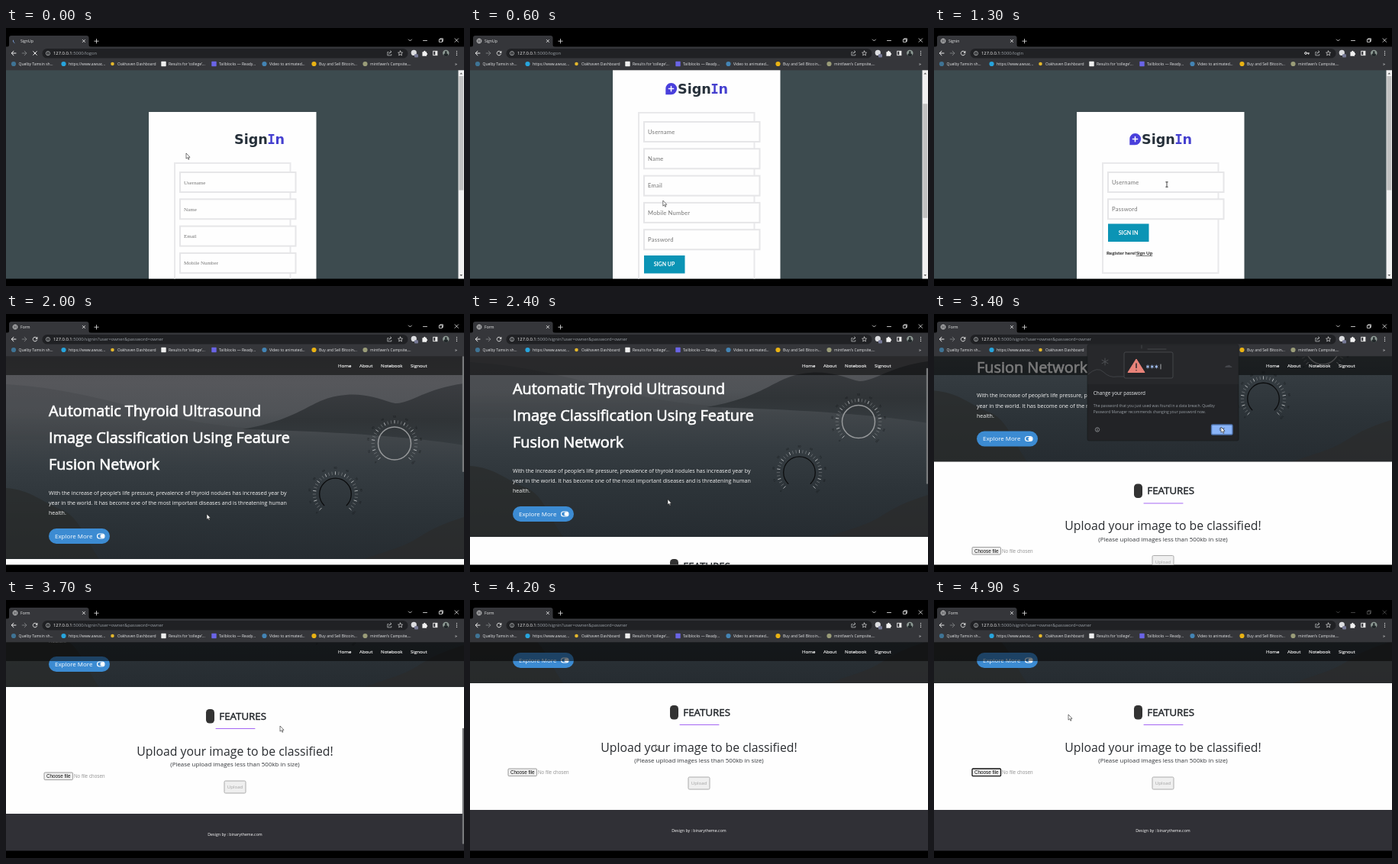
These frames come from a looping animation (600x338 px, 5 s). An HTML page:

```html
<!DOCTYPE html>
<html lang="en">
<head>
<meta charset="utf-8">
<title>Sign in and upload</title>
<style>
  html, body { margin: 0; width: 100%; height: 100%; overflow: hidden; background: #000; }
  svg { display: block; width: 100vw; height: 100vh; }
  text { font-family: "Open Sans", "Noto Sans", sans-serif; white-space: pre; }
  .serif { font-family: "Liberation Serif", serif; }
  .lato { font-family: Lato, sans-serif; }
  .arial { font-family: "Liberation Sans", sans-serif; }
  .logo { font-family: "DejaVu Sans", sans-serif; font-weight: 700; }
  .mono { font-family: "DejaVu Sans Mono", monospace; }
  .line { fill: none; stroke-linecap: round; stroke-linejoin: round; }
</style>
</head>
<body>
<svg id="stage" viewBox="0 0 600 338"></svg>
<script>
const LOOP = 5000, STEP = 100;

// ---------- drawing helpers ----------
const text = (x, y, s, size, fill, extra = '') =>
  `<text x="${x}" y="${(y + size * 0.36).toFixed(2)}" font-size="${size}" fill="${fill}" ${extra}>${s}</text>`;
const rect = (x, y, w, h, fill, extra = '') =>
  `<rect x="${x}" y="${y}" width="${w}" height="${h}" fill="${fill}" ${extra}/>`;
const dot = (x, y, r, fill, extra = '') =>
  `<circle cx="${x}" cy="${y}" r="${r}" fill="${fill}" ${extra}/>`;
const line = (d, color, width = 0.8, extra = '') =>
  `<path class="line" d="${d}" stroke="${color}" stroke-width="${width}" ${extra}/>`;
const shape = (d, fill, extra = '') => `<path d="${d}" fill="${fill}" ${extra}/>`;
const group = (id, body, extra = '') => `<g id="${id}" ${extra}>${body}</g>`;
const bold = (color, w) => `stroke="${color}" stroke-width="${w}"`;
const middle = 'text-anchor="middle"';

// ---------- sign-up and sign-in pages ----------
const frame = (x, y, w, h) => rect(x, y, w, h, 'none', 'stroke="#e9e9eb" stroke-width="2"');
const field = (i, id, label, cls) => {
  const y = 189 + i * 35.3;
  return rect(228, y, 151.5, 26, '#fefefe', 'stroke="#e6e6e8" stroke-width="2"') +
    text(233, y + 13, label, cls === 'serif' ? 7.03 : 7.6, '#757575',
      `${id ? `id="${id}"` : ''} class="${cls}" ${cls === 'lato' ? 'letter-spacing=".22"' : ''}`);
};
const heading = x =>
  `<text class="logo" x="${x}" y="152.3" font-size="17.6" fill="#26303a">Sign<tspan class="mono" fill="#4540cf" dx="-.5">I</tspan><tspan fill="#4540cf" dx="-.5">n</tspan></text>`;
const bubble = shape('M263.5 138a7.6 7.6 0 1 1 0 15.2h-7.2v-7.6a7.4 7.4 0 0 1 7.2-7.6z', '#4a40dc') +
  line('M260.4 145.6h6.2M263.5 142.5v6.2', '#fff', 1.5);
const button = (y, label) =>
  rect(228, y, 53.5, 23.5, '#0b94b5') +
  text(254.5, y + 11.7, label, 7, '#fff', `class="lato" font-weight="700" ${middle}`);
const hint = (y, lead, link) =>
  text(226, y, `${lead}<tspan text-decoration="underline">${link}</tspan>`, 6.3, '#222', 'class="lato" font-weight="700"');
const card = h => rect(187, 110, 219.5, h, '#fefefe');
const fields = cls => ['Username', 'Name', 'Email', 'Mobile Number', 'Password']
  .map((s, i) => field(i, '', s, cls)).join('');

const backdrop = rect(0, 55, 600, 274, '#3d4b4f');
const sideBar = id => rect(592.5, 55, 7.5, 274, '#f1f1f1') +
  rect(593.3, 63, 6, 149.5, '#c1c1c1', `id="${id}"`) +
  shape('M594.5 60.5l1.8-2 1.8 2z', '#555') + shape('M594.5 323l1.8 2 1.8-2z', '#555');

const signUp = backdrop +
  group('signUpBody', card(380) + frame(221, 177, 151.5, 262) +
    group('plain', heading(299) + fields('serif')) +
    group('styled', bubble + heading(272) + fields('lato')) +
    button(364, 'SIGN UP') + hint(402, 'Registered?', 'Sign In')) +
  sideBar('signUpThumb');

const signIn = backdrop + card(230) + bubble + heading(272) + frame(221, 177, 151.5, 144) +
  field(0, 'userText', 'Username', 'lato') + field(1, 'passText', 'Password', 'lato') +
  button(256.5, 'SIGN IN') + hint(295, 'Register here!', 'Sign Up') + sideBar('signInThumb');

// ---------- home page ----------
function gauge(cx, cy, r, ring, gap) {
  let out = '';
  for (let i = 0; i <= 30; i++) {
    const a = -135 + i * 9, big = i % 3 === 0;
    out += `<g transform="translate(${cx} ${cy}) rotate(${a})">` +
      line(`M0 ${-r - 5}V${-r - 8.5}`, big ? '#b4b7b9' : '#7d8285', big ? 0.9 : 0.6) +
      (big ? text(0, -r - 13.5, i / 3 * 10, 3.4, '#15181a', middle) : '') + '</g>';
  }
  const k = r * Math.SQRT1_2;
  return out + (gap
    ? line(`M${cx - k} ${cy + k}A${r} ${r} 0 1 1 ${cx + k} ${cy + k}`, ring, 1.3)
    : dot(cx, cy, r, 'none', `stroke="${ring}" stroke-width="1.5"`));
}

const scenery =
  rect(0, 55, 600, 266, 'url(#lake)') +
  shape('M0 92C70 96 130 112 190 128S280 146 330 151L330 165H0z', '#3c4144', 'opacity=".3"') +
  shape('M310 151C345 145 368 136 388 126S420 108 445 106S485 110 505 116S545 98 600 91V172C540 162 440 154 310 151z', 'url(#hill)') +
  shape('M0 228C32 230 48 247 72 256S102 293 122 320.800H0z', '#292a29', 'opacity=".65"') +
  shape('M470 320.800C500 310 520 306 540 293S575 274 600 266V320.800z', '#2b2c2b', 'opacity=".7"');

const words = [
  ['Automatic Thyroid Ultrasound', 127], ['Image Classification Using Feature', 162], ['Fusion Network', 197.3]
].map(([s, y]) => text(56, y, s, 19.85, '#fff', bold('#fff', 0.7))).join('') + [
  ['With the increase of people’s life pressure, prevalence of thyroid nodules has increased year by', 234.3],
  ['year in the world. It has become one of the most important diseases and is threatening human', 247.5],
  ['health.', 260.8]
].map(([s, y]) => text(56, y, s, 7.09, '#f4f4f4')).join('');

const explore = rect(56, 281, 80, 20, '#3c8bd2', 'rx="10"') +
  text(64, 290.7, 'Explore More', 7.95, '#fff') +
  rect(119.5, 288, 9.5, 6, 'none', 'rx="3" stroke="#fff" stroke-width="1.2"') + dot(126, 291, 2.5, '#fff');

const features =
  rect(0, 321, 600, 166, '#fefefe') +
  rect(262, 350, 11, 18.5, '#333', 'rx="4.5"') +
  text(279.3, 359, 'FEATURES', 13.3, '#212529', bold('#212529', 0.45)) +
  line('M275 375.500H326', '#9a55f2', 0.9) +
  text(300, 405, 'Upload your image to be classified!', 15.8, '#292c30', middle) +
  text(300, 422.3, '(Please upload images less than 500kb in size)', 7.93, '#33363a', middle) +
  rect(50, 433, 37.5, 9.6, '#efefef', 'id="choose" rx="1.2" stroke="#777" stroke-width=".7"') +
  text(68.7, 437.8, 'Choose file', 6.3, '#111', `class="arial" ${middle}`) +
  text(89, 437.8, 'No file chosen', 6.4, '#989898', 'class="arial"') +
  rect(286, 444, 28, 16, '#efefef', 'rx="1.5" stroke="#aaa" stroke-width="1"') +
  text(300, 452, 'Upload', 6.1, '#a2a2a2', middle) +
  rect(0, 487, 600, 54, '#303036') +
  text(300, 514, 'Design by : binarytheme.com', 5.27, '#fff', middle);

const nav = rect(0, 55, 600, 25, '#000', 'opacity=".52"') +
  [['Home', 435], ['About', 463], ['Notebook', 491], ['Signout', 530]]
    .map(([s, x]) => text(x, 67.5, s, 6.15, '#fff', bold('#fff', 0.12))).join('');

const home = group('homeBody', scenery +
    group('gauges', gauge(509, 169.5, 21.5, '#96989a', false) + gauge(431.5, 236, 20.8, '#0b0c0d', true)) +
    words + explore + features) +
  nav + rect(597.8, 55, 2.2, 152, '#77797b', 'id="homeThumb" rx="1"');

// ---------- browser window ----------
const marks = [
  [10, 'Quelby Tamsin sh...', '#3f7394'], [75.5, 'https://www.awsac...', '#27a4dc'],
  [139.5, 'Oakhaven Dashboard', '#e3b62c'], [206.5, 'Results for ‘college’...', '#eee', 1],
  [272.5, 'Tailblocks — Ready...', '#6a64e6', 1], [338.5, 'Video to animated...', '#4384b4'],
  [403.5, 'Buy and Sell Bitcoin...', '#e9b213'], [470.5, 'mintfawn’s Campsite,...', '#9a9c78']
].map(([x, s, c, square]) =>
  (square ? rect(x - 3.2, 43.8, 6.4, 6.4, c, 'rx=".6"') : dot(x, 47, c === '#e3b62c' ? 2.3 : 3.1, c)) +
  text(x + 6.5, 47, s, 5, '#e6e7e9')).join('');

const windowFrame =
  rect(0, 0, 600, 25, '#000') + rect(0, 24.5, 600, 30.8, '#35363a') +
  shape('M1 25Q4 25 4 22V13Q4 10 7 10H105.5Q108.5 10 108.5 13V22Q108.5 25 112 25z', '#35363a') +
  rect(47.5, 27, 479, 12.6, '#202124', 'rx="6.3"') +
  group('globe', dot(12, 17, 2.9, 'none', 'stroke="#ddd" stroke-width=".8"') +
    line('M9.2 17H14.8M12 14.2Q9.8 17 12 19.8Q14.2 17 12 14.2', '#ddd', 0.5)) +
  group('spinner', line('M11 19.5A2.8 2.8 0 0 1 9.4 16.2', '#8ab4f8', 0.8)) +
  text(19, 17, '', 5.1, '#eceded', 'id="tabTitle"') +
  line('M100.2 15.3l3.4 3.4M103.6 15.3l-3.4 3.4M118.5 14.5v5.4M115.8 17.2h5.4', '#e8e8e8', 0.8) +
  group('caption', line('M527.4 15l2 2 2-2M546.5 16.5h5M567.8 14.8h3.6v3.6h-3.6zM568.8 14.8v-1h3.6v3.6h-1M588 13.8l4.6 4.6M592.6 13.8l-4.6 4.6', '#eee', 0.8)) +
  line('M13 33H7.4M10 30.2L7.2 33L10 35.8', '#f0f0f0', 1) +
  line('M21.2 33H26.8M24.2 30.2L27 33L24.2 35.8', '#7d7f82', 0.9) +
  group('reload', line('M40.2 31.2A2.8 2.8 0 1 0 40.7 34', '#f0f0f0', 0.9) + shape('M41.3 29.8v2.9h-2.9z', '#f0f0f0')) +
  group('stop', line('M35.7 30.7l4.6 4.6M40.3 30.7l-4.6 4.6', '#f0f0f0', 1)) +
  dot(55, 33.2, 2.6, 'none', 'stroke="#c8cacc" stroke-width=".7"') +
  line('M55 33.1v1.3M55 31.9v.1', '#c8cacc', 0.7) +
  text(62, 33, '<tspan fill="#f1f1f1">127.0.0.1</tspan><tspan id="path"></tspan>', 5.85, '#9aa0a6') +
  group('key', dot(487, 33, 1.4, 'none', 'stroke="#e8e8e8" stroke-width="1"') + line('M488.5 33h3M490.7 33v1.4', '#e8e8e8', 1)) +
  line('M501 31.5h-1.2v4.4h5v-1.5M501.6 34q.3-2.8 3-2.8M503.5 29.8l1.5 1.4-1.5 1.4', '#c8cacc', 0.7) +
  line('M516.6 30l.9 2 2.1.2-1.6 1.5.5 2.2-1.9-1.2-1.9 1.2.5-2.2-1.6-1.5 2.1-.2z', '#e0e0e0', 0.7) +
  dot(534.3, 32.4, 3.6, '#dcdde0') + rect(535, 34.2, 5, 4.2, '#777a96', 'rx="1"') +
  shape('M545.4 31.2h1.8a1.2 1.2 0 1 1 2.3 0h1.6v1.8a1.1 1.1 0 1 1 0 2.2v1.6h-5.7z', '#f2f2f2') +
  rect(559.7, 30.3, 5.2, 5.4, 'none', 'stroke="#eee" stroke-width=".9"') + rect(562.3, 30.3, 2.6, 5.4, '#eee') +
  dot(576.3, 33, 4.2, '#8d9a94') + dot(576.3, 31.7, 1.4, '#22282a') + shape('M573.3 35.9a3 3 0 0 1 6 0a4.2 4.2 0 0 1-6 0z', '#22282a') +
  [30.6, 33, 35.4].map(y => dot(590.5, y, 0.65, '#eee')).join('') +
  marks + text(588, 46.5, '»', 6, '#eee');

const star = x => line(`M${x} 67v4M${x - 1.7} 68l3.4 2M${x + 1.7} 68l-3.4 2`, '#a9c7fa', 0.9);
const dialog =
  rect(201, 40, 198, 126, '#222326', 'rx="2" stroke="#17181a" stroke-width=".6"') +
  rect(201.3, 40.3, 197.4, 51.7, '#27282b') +
  line('M202 79Q214 68 222 76T240 82H312', '#46484c', 0.8) +
  line('M224 58v9M220 60.300l8 4.500M228 60.300l-8 4.500', '#56585c', 0.8) +
  rect(249, 50, 64, 34, '#242528', 'rx="2" stroke="#4c4e52" stroke-width=".8"') +
  line('M272 41v4M280 46h24', '#4c4e52', 0.8) +
  shape('M381 70q1-3 3.5-2.5q3-2 4 .8q2 0 2 1.7z', '#43454a') +
  shape('M265 59L276 76.5H254z', '#e98379', 'stroke="#e98379" stroke-width="1" stroke-linejoin="round"') +
  line('M265 65v5.5M265 73.7v.1', '#292a2d', 1.5) +
  star(280) + star(285.7) + star(291.4) + line('M297 66v6', '#e8eaed', 0.7) +
  text(208.8, 104, 'Change your password', 6.4, '#eceef0') +
  text(208.8, 120.3, 'The password that you just used was found in a data breach. Quelby', 5, '#9aa0a6') +
  text(208.8, 128.6, 'Password Manager recommends changing your password now.', 5, '#9aa0a6') +
  dot(214, 151.5, 2.7, 'none', 'stroke="#a6aaae" stroke-width=".7"') + line('M214 151.3v1.5M214 150v.1', '#a6aaae', 0.7) +
  rect(363.5, 145, 27.5, 13, '#8ab4f8', 'rx="1.5" stroke="#5276b0" stroke-width="1.4"') +
  text(377.2, 151.5, 'OK', 5.3, '#202124', middle);

const fade = (id, ...stops) => `<linearGradient id="${id}" x2="0" y2="1">` +
  stops.map(([at, c]) => `<stop offset="${at}" stop-color="${c}"/>`).join('') + '</linearGradient>';
const defs = `<defs>${fade('lake', [0, '#505155'], [0.13, '#56575b'], [0.28, '#505357'],
  [0.4, '#41464a'], [0.55, '#363d42'], [0.78, '#2c3338'], [1, '#262c31'])}` +
  `${fade('hill', [0, '#3b3d41'], [0.6, '#303437'], [1, '#353b3f'])}
  <clipPath id="view"><rect y="55" width="600" height="273.5"/></clipPath></defs>`;

const arrow = shape('M0 0V7.2L1.7 5.7L2.9 8.3L4 7.8L2.9 5.3H5z', '#fff', 'stroke="#222" stroke-width=".6"');
const beam = line('M-1.3 -3.2H1.3M0 -3.2V3.2M-1.3 3.2H1.3', '#222', 0.8);

document.getElementById('stage').innerHTML = defs + rect(0, 0, 600, 338, '#000') +
  `<g clip-path="url(#view)">${group('signUp', signUp)}${group('signIn', signIn)}${group('home', home)}</g>` +
  windowFrame + group('dialog', dialog) + group('cursor', group('arrow', arrow) + group('beam', beam));

// ---------- timeline ----------
const pointer = [[0, 236, 164], [300, 245, 190], [800, 258, 250], [900, 270, 292], [1100, 270, 292],
  [1300, 305, 205], [1500, 305, 205], [1600, 290, 238], [1700, 285, 240], [1800, 262, 268], [2000, 263, 262],
  [2600, 257, 233], [2900, 257, 233], [3300, 376, 148], [3500, 376, 148], [3700, 359, 165],
  [4000, 359, 165], [4500, 70, 226], [4700, 70, 226], [4900, 176, 150]];
const homeScroll = [[2300, 0], [2600, 87], [2800, 127.5], [3500, 127.5], [3700, 207], [3800, 212]];
const formScroll = [[300, 0], [800, 110]];

function at(track, t, k = 1) {
  const i = track.findIndex(p => p[0] > t);
  if (i < 0) return track[track.length - 1][k];
  if (i === 0) return track[0][k];
  const a = track[i - 1], b = track[i];
  return a[k] + (b[k] - a[k]) * (t - a[0]) / (b[0] - a[0]);
}

const el = id => document.getElementById(id);
const show = (id, on) => el(id).setAttribute('display', on ? 'inline' : 'none');
const move = (id, x, y) => el(id).setAttribute('transform', `translate(${x} ${y})`);
const set = (id, s) => { if (el(id).textContent !== s) el(id).textContent = s; };

function type(id, label, typed, n) {
  set(id, n > 0 ? typed.slice(0, n) : label);
  el(id).setAttribute('fill', n > 0 ? '#222' : '#757575');
}

function render(t) {
  const page = t < 1100 ? 'signUp' : t < 1900 ? 'signIn' : 'home';
  ['signUp', 'signIn', 'home'].forEach(id => show(id, id === page));
  set('tabTitle', { signUp: 'SignUp', signIn: 'Signin', home: 'Form' }[page]);
  set('path', { signUp: ':5000/logon', signIn: ':5000/login', home: ':5000/signin?user=owner&password=owner' }[page]);

  const loading = t < 100 || t === 1000;
  show('spinner', loading); show('stop', loading);
  show('globe', !loading); show('reload', !loading);
  show('key', page === 'signIn');
  show('plain', t < 100); show('styled', t >= 100);

  const form = at(formScroll, t), y = at(homeScroll, t);
  move('signUpBody', 0, -form); move('signUpThumb', 0, form * 0.55);
  move('homeBody', 0, -y); move('homeThumb', 0, y * 0.545);
  move('gauges', 0, y * 0.02);
  // the thin scrollbar hides once the page has rested for a while
  show('homeThumb', t < 2400 || at(homeScroll, t - 400) !== y);

  type('userText', 'Username', 'owner', (t - 1300) / 100 * 2.5);
  type('passText', 'Password', '•••••', (t - 1500) / 100 * 2.5);

  show('dialog', t >= 2900 && t < 3500);
  const picked = t >= 4600;
  el('choose').setAttribute('stroke', picked ? '#111' : '#777');
  el('choose').setAttribute('stroke-width', picked ? 1.3 : 0.7);
  el('caption').setAttribute('opacity', picked ? 0.35 : 1);

  const beamOn = t >= 1300 && t <= 1700;
  show('beam', beamOn); show('arrow', !beamOn);
  move('cursor', at(pointer, t, 1), at(pointer, t, 2));
}

const start = performance.now();
function tick() {
  const t = (performance.now() - start) % LOOP;
  render(Math.floor(t / STEP) * STEP);
  requestAnimationFrame(tick);
}
tick();
</script>
</body>
</html>
```
